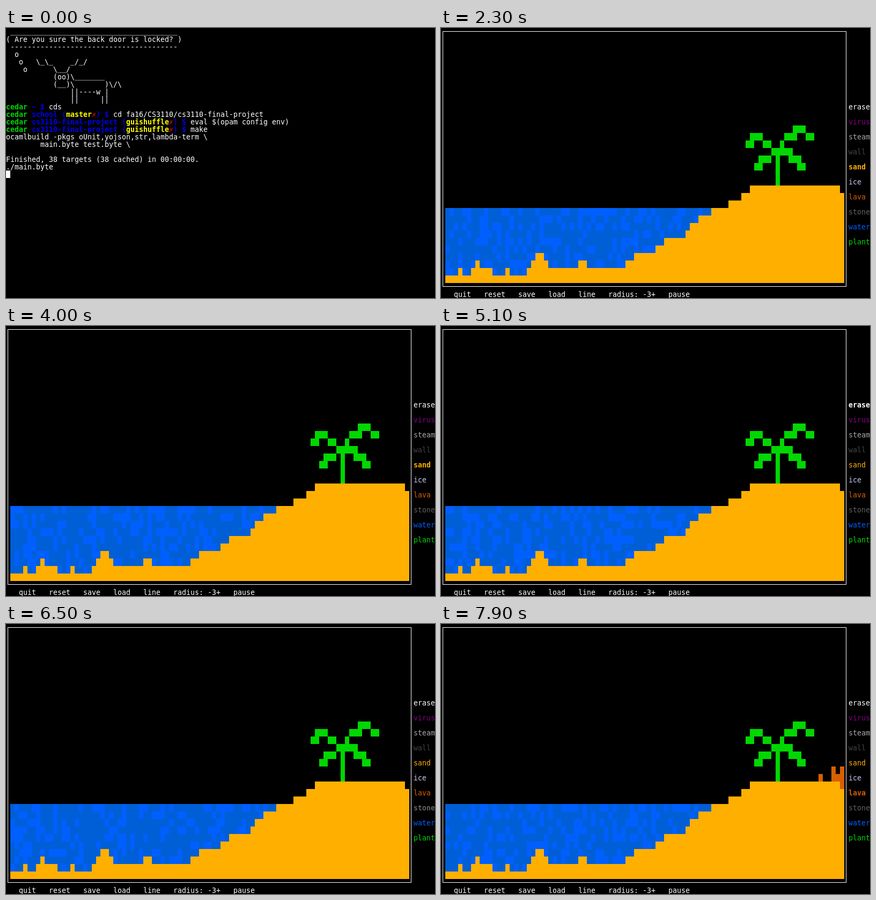
An HTML page with a canvas for the animation above (8 s loop, 800 by 504 pixels).

```html
<!DOCTYPE html>
<html lang="en">
<head>
<meta charset="utf-8">
<title>Falling sand in a terminal</title>
<style>
  html, body { margin: 0; width: 100%; height: 100%; overflow: hidden; background: #000; }
  canvas { display: block; }
</style>
</head>
<body>
<canvas id="stage" width="800" height="504"></canvas>
<script>
const ctx = document.getElementById('stage').getContext('2d');
const LOOP = 8000, STEP = 100;
const CW = 8, CH = 14;
const FONT = '13.288px "DejaVu Sans Mono", "Noto Sans Mono", monospace';
const WHITE = '#fff', GREEN = '#00d700', BLUE = '#0000ee', YELLOW = '#ffff00', RED = '#e00000';
const SAND = '#ffaf00', LAVA = '#d75f00', WATER = ['#005fd7', '#005fff'];

// Text on the character grid; returns the next free column.
// Underscores are lifted so that they stay inside their row.
function put(col, row, text, color = WHITE, bold = false) {
  ctx.font = (bold ? 'bold ' : '') + FONT;
  ctx.fillStyle = color;
  for (const ch of text) {
    const base = ch === '_' ? 10 : 12;
    if (ch !== ' ') ctx.fillText(ch, col * CW, row * CH + base);
    col++;
  }
  return col;
}

function cells(row, from, to, color, rows = 1) {
  ctx.fillStyle = color;
  ctx.fillRect(from * CW, row * CH, (to - from) * CW, rows * CH);
}

// ---- shell ----
const COW = [
  ' ' + '_'.repeat(39),
  '( Are you sure the back door is locked? )',
  ' ' + '-'.repeat(39),
  '  o',
  '   o   \\_\\_    _/_/',
  '    o      \\__/',
  '           (oo)\\_______',
  '           (__)\\       )\\/\\',
  '               ||----w |',
  '               ||     ||'
];
const OUTPUT = [
  'ocamlbuild -pkgs oUnit,yojson,str,lambda-term \\',
  '        main.byte test.byte \\',
  '',
  'Finished, 38 targets (38 cached) in 00:00:00.',
  './main.byte'
];

function prompt(row, dir, branch, command) {
  let col = put(0, row, 'cedar ', GREEN, true);
  col = put(col, row, dir + ' ', BLUE, true);
  if (branch) {
    col = put(col, row, '(', BLUE, true);
    col = put(col, row, branch, YELLOW, true);
    col = put(col, row, '✗', RED, true);
    col = put(col, row, ') ', BLUE, true);
  }
  col = put(col, row, '$ ', BLUE, true);
  put(col, row, command);
}

function drawShell() {
  COW.forEach((line, i) => put(0, i, line));
  prompt(10, '~', '', 'cds');
  prompt(11, 'school', 'master', 'cd fa16/CS3110/cs3110-final-project');
  prompt(12, 'cs3110-final-project', 'guishuffle', 'eval $(opam config env)');
  prompt(13, 'cs3110-final-project', 'guishuffle', 'make');
  OUTPUT.forEach((line, i) => put(0, 14 + i, line));
  cells(19, 0, 1, WHITE);
}

// ---- game ----
const MENU = [
  ['erase', WHITE], ['virus', '#870087'], ['steam', '#a8a8a8'], ['wall', '#444444'],
  ['sand', SAND], ['ice', '#c8c8f0'], ['lava', LAVA], ['stone', '#626262'],
  ['water', '#005fff'], ['plant', GREEN]
];
// The selection moves up one entry at each time and wraps from top to bottom.
const KEYS = [4300, 4500, 4700, 4900, 5700, 6200, 6400, 7200];

const PALM = [
  [13, 82, 85], [14, 72, 75], [14, 80, 83], [14, 85, 87],
  [15, 71, 73], [15, 75, 77], [15, 79, 80], [16, 77, 82],
  [17, 74, 77], [17, 81, 84], [18, 73, 75], [18, 83, 85]
];
const SHORE = [63, 60, 58, 57, 52, 50, 45, 43, 20];
const BUMPS = [
  [30, 22, 24], [31, 8, 9], [31, 21, 25], [31, 32, 34],
  [32, 4, 5], [32, 7, 12], [32, 15, 16]
];

function noise(x, y, n) {
  let h = Math.imul(x + 1, 374761393) ^ Math.imul(y + 1, 668265263) ^ Math.imul(n + 1, 1274126177);
  h = Math.imul(h ^ (h >>> 15), 2246822519);
  h = Math.imul(h ^ (h >>> 13), 3266489917);
  return ((h ^ (h >>> 16)) >>> 0) / 4294967296;
}

function drawFrame(t) {
  ctx.fillStyle = WHITE;
  ctx.fillRect(3, 6, 753, 1);
  ctx.fillRect(3, 482, 753, 1);
  ctx.fillRect(3, 6, 1, 477);
  ctx.fillRect(755, 6, 1, 477);
  put(3, 35, 'quit   reset   save   load   line   radius: -3+   pause');
  const moves = KEYS.filter(k => t >= k).length;
  const selected = (4 - moves + 2 * MENU.length) % MENU.length;
  MENU.forEach(([name, color], i) => put(95, 10 + 2 * i, name, color, i === selected));
}

function drawIsland() {
  for (const [row, from, to] of PALM) cells(row, from, to, GREEN);
  cells(17, 78, 79, GREEN, 4);
  cells(21, 72, 93, SAND);
  cells(22, 70, 94, SAND);
  cells(23, 67, 94, SAND);
}

function drawSea(step) {
  SHORE.forEach((end, i) => {
    const row = 24 + i;
    for (let x = 1; x < end; x++) cells(row, x, x + 1, WATER[noise(x, row, step) < 0.34 ? 1 : 0]);
    cells(row, end, 94, SAND);
  });
  cells(33, 1, 94, SAND);
  for (const [row, from, to] of BUMPS) cells(row, from, to, SAND);
}

function drawLava(t) {
  if (t < 7800) return;
  const landed = t >= 7900;
  cells(landed ? 20 : 19, 88, 89, LAVA);
  cells(20, 91, 94, LAVA);
  cells(21, 93, 94, LAVA);
  if (landed) {
    cells(19, 91, 92, LAVA);
    cells(19, 93, 94, LAVA);
  }
}

function draw(time) {
  const step = Math.floor((time % LOOP) / STEP), t = step * STEP;
  ctx.fillStyle = '#000';
  ctx.fillRect(0, 0, 800, 504);
  if (t < 500) return drawShell();
  drawFrame(t);
  if (t >= 1700) drawIsland();
  if (t >= 1800) drawSea(step);
  drawLava(t);
}

function tick() {
  draw(performance.now());
  requestAnimationFrame(tick);
}
tick();
</script>
</body>
</html>
```
